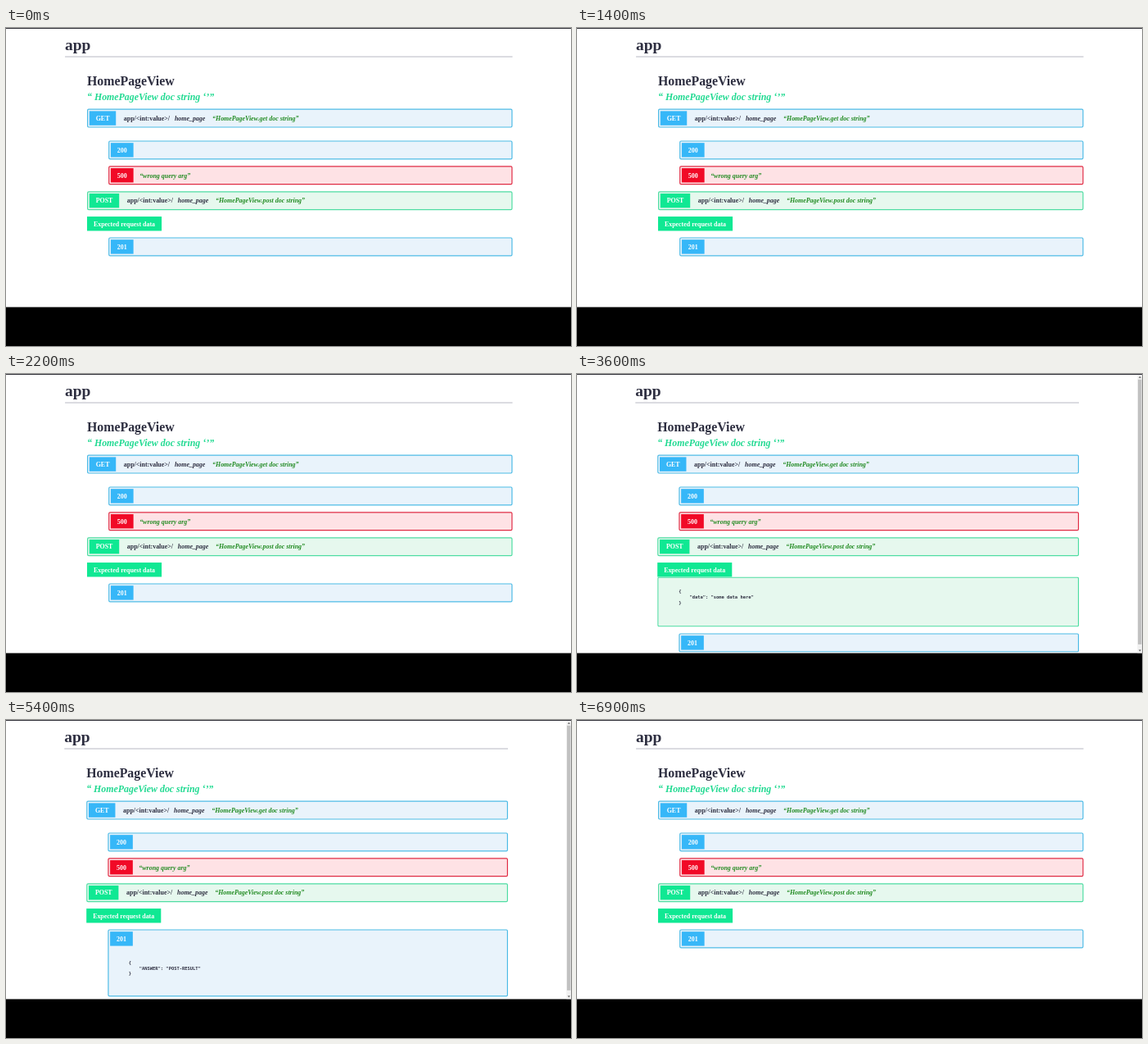
Animation of 690x388 px, one loop 7000 ms. Source, as an HTML page:

```html
<!DOCTYPE html>
<html lang="en">
<head>
<meta charset="utf-8">
<title>app</title>
<style>
  html, body { margin: 0; width: 100%; height: 100%; overflow: hidden; background: #000; }
  #stage { position: relative; width: 690px; height: 388px; overflow: hidden; background: #000; }
  #stage::before { content: ""; position: absolute; inset: 0 0 auto; height: 1px; background: #34343c; z-index: 2; }

  /* The page is laid out at desktop size and shown scaled down. */
  #view {
    position: absolute; left: 0; top: 0; width: 1743px; height: 860px; overflow: hidden;
    transform: scale(.396); transform-origin: 0 0; background: #fff;
    font: bold 20px/52px "Liberation Serif", serif; color: #2e2f41;
  }
  main { position: absolute; top: 0; left: 182px; width: 1380px; }
  h1, h2, .about { position: absolute; margin: 0; white-space: nowrap; line-height: 50px; }
  h1 { left: 0; right: 0; top: 28px; height: 59px; font-size: 49px; border-bottom: 3px solid #c3c4cd; }
  h2 { left: 68px; top: 138px; font-size: 40px; }
  .about { left: 68px; top: 187px; font-size: 30px; font-style: italic; color: #22da92; }
  .list { margin: 249px 0 0 68px; }

  .row {
    position: relative; box-sizing: border-box; height: 58px; margin-bottom: 20px;
    border: 3px solid var(--edge); border-radius: 5px; background: var(--fill);
    overflow: hidden; white-space: nowrap;
  }
  .row.sub { margin-left: 66px; }
  .get { margin-bottom: 40px; }
  .blue { --edge: #4dbbe6; --fill: #e9f3fb; --tag: #36b7f8; }
  .red { --edge: #e02d45; --fill: #fee2e5; --tag: #f10a27; }
  .green { --edge: #4fdda3; --fill: #e6f8ee; --tag: #10e893; }
  .tag {
    float: left; height: 44px; margin: 4px 0 0 4px; padding: 0 20px;
    line-height: 44px; color: #fff; background: var(--tag);
  }
  .url { margin-left: 24px; }
  .name { margin-left: 15px; }
  .doc { margin-left: 22px; color: #228b22; }
  .sub .doc { margin-left: 19px; }
  .tag.data { float: none; width: max-content; margin: 0; }
  .panel { height: 0; margin-bottom: 20px; overflow: hidden; }
  .panel .row { height: 154px; margin: 0; }
  pre {
    position: absolute; left: 61px; top: 91px; margin: 0;
    font: bold 13.7px/17px "DejaVu Sans Mono", monospace;
  }
  .panel pre { left: 63px; top: 34px; }

  #bar { position: absolute; right: 0; top: 2px; bottom: 0; width: 15px; background: #f1f1f1; visibility: hidden; }
  #bar i { position: absolute; left: 2px; right: 2px; top: 15px; bottom: 27px; background: #c1c1c1; }
  #bar::before, #bar::after { content: ""; position: absolute; left: 3.5px; border: 4px solid transparent; }
  #bar::before { top: 1px; border-bottom: 5px solid #606060; }
  #bar::after { bottom: 1px; border-top: 5px solid #606060; }

  /* Every toggle is a hard switch on the same 7 s clock. */
  main, #bar, .toggle { animation: 7s step-end infinite; }
  main { animation-name: narrow; }
  #bar { animation-name: scrollbar; }
  .ok { animation-name: ok; }
  .fail { animation-name: fail; }
  .panel { animation-name: body; }
  .made { animation-name: made; }
  @keyframes narrow {
    7.142%, 22.857%, 51.428%, 77.142% { left: 180px; width: 1368px; }
    11.428%, 27.142%, 68.571%, 97.142% { left: 182px; width: 1380px; }
  }
  @keyframes scrollbar {
    7.142%, 22.857%, 51.428%, 77.142% { visibility: visible; }
    11.428%, 27.142%, 68.571%, 97.142% { visibility: hidden; }
  }
  @keyframes ok { 7.142% { height: 207px; } 11.428% { height: 58px; } }
  @keyframes fail { 22.857% { height: 207px; } 27.142% { height: 58px; } }
  @keyframes body { 51.428% { height: 154px; } 68.571% { height: 0; } }
  @keyframes made { 77.142% { height: 207px; } 97.142% { height: 58px; } }
</style>
</head>
<body>
<div id="stage">
  <div id="view">
    <main>
      <h1>app</h1>
      <h2>HomePageView</h2>
      <div class="about">“ HomePageView doc string ‘’”</div>
      <div class="list">
        <div class="row get blue"><span class="tag">GET</span><span class="url">app/&lt;int:value&gt;/</span><i class="name">home_page</i><i class="doc">“HomePageView.get doc string”</i></div>
        <div class="row sub blue toggle ok"><span class="tag">200</span>
<pre>{
    "ANSWER": "GET-RESULT"
}</pre></div>
        <div class="row sub red toggle fail"><span class="tag">500</span><i class="doc">“wrong query arg”</i>
<pre>{
    "ANSWER": "GET-ERROR"
}</pre></div>
        <div class="row green"><span class="tag">POST</span><span class="url">app/&lt;int:value&gt;/</span><i class="name">home_page</i><i class="doc">“HomePageView.post doc string”</i></div>
        <div class="tag data green">Expected request data</div>
        <div class="panel toggle"><div class="row green">
<pre>{
    "data": "some data here"
}</pre></div></div>
        <div class="row sub blue toggle made"><span class="tag">201</span>
<pre>{
    "ANSWER": "POST-RESULT"
}</pre></div>
      </div>
    </main>
    <div id="bar"><i></i></div>
  </div>
</div>
</body>
</html>
```
